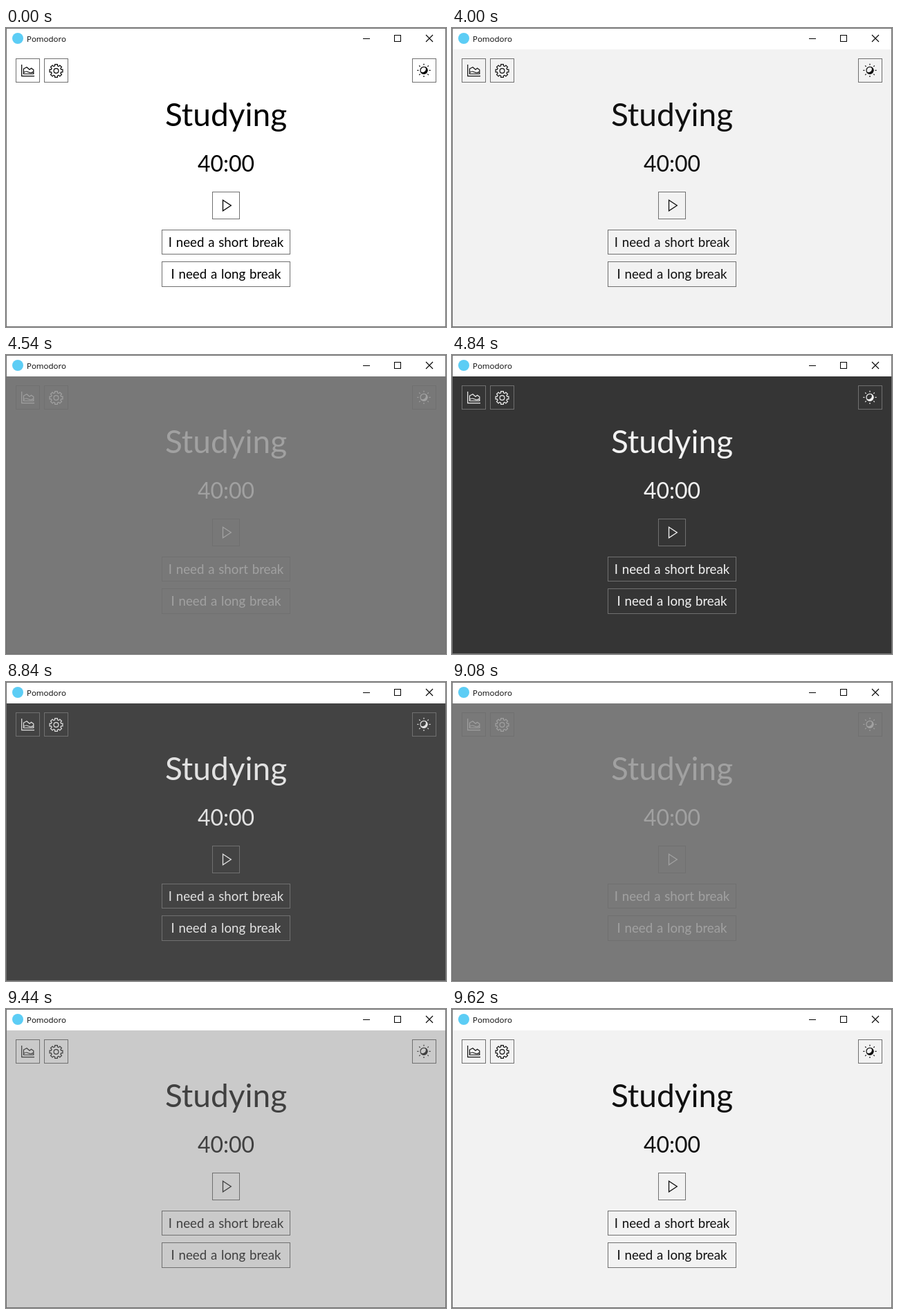
Animation of 636 by 433 pixels, one loop 9680 ms. Source, as an HTML page:

```html
<!DOCTYPE html>
<html lang="en">
<head>
<meta charset="utf-8">
<title>Pomodoro</title>
<style>
  html, body { margin: 0; width: 100%; height: 100%; overflow: hidden; background: #fff; }
  svg { display: block; width: 100vw; height: 100vh; }

  .surface { fill: #fff; animation: surface 9680ms infinite; }
  .content { color: #000; animation: ink 9680ms infinite; }
  .surface, .content { animation-timing-function: step-end; }

  /* Each fade takes 15 steps of 60 ms; the last step back is the loop restart. */
  @keyframes surface {
    0% { fill: #fff; }
    41.3223% { fill: #fff; animation-timing-function: steps(15, jump-start); }
    50.6198%  { fill: #353535; }
    91.3223% { fill: #353535; animation-timing-function: steps(14, jump-start); }
    100% { fill: #f2f2f2; }
  }
  @keyframes ink {
    0% { color: #000; }
    41.3223% { color: #000; animation-timing-function: steps(15, jump-start); }
    50.6198% { color: #f2f2f2; }
    91.3223% { color: #f2f2f2; animation-timing-function: steps(14, jump-start); }
    100% { color: #101010; }
  }

  .box { fill: none; stroke: #707070; shape-rendering: crispEdges; }
  .line { fill: none; stroke: currentColor; stroke-width: 1.2; }
  .label { fill: currentColor; font-family: Lato, sans-serif; text-anchor: middle; }
  .title { font-size: 46px; }
  .timer { font-size: 32px; }
  .button { font-size: 18.7px; word-spacing: 1px; }
  .caption { font: 11.5px "Open Sans", "Noto Sans", sans-serif; }
  .controls { fill: none; stroke: #000; }
</style>
</head>
<body>
<svg viewBox="0 0 636 433">
  <rect width="636" height="433" fill="#fff"/>
  <circle cx="17" cy="15" r="8" fill="#5ccdf5"/>
  <text class="caption" x="30" y="20">Pomodoro</text>
  <g class="controls">
    <path d="M516 15.5h10M561.5 10.5h9v9h-9z" shape-rendering="crispEdges"/>
    <path d="M607 10l10 10M617 10l-10 10" stroke-width="1.1"/>
  </g>

  <rect class="surface" y="31" width="636" height="402"/>
  <g class="box">
    <path d="M.5 .5h635v432h-635z"/>
    <path d="M14.5 44.5h34v34h-34zM55.5 44.5h34v34h-34zM587.5 44.5h34v34h-34z"/>
    <path d="M298.5 237.5h39v39h-39z"/>
    <path d="M225.5 292.5h185v35h-185zM225.5 338.5h185v36h-185z"/>
  </g>

  <g class="content">
    <g class="line">
      <path d="M22.7 53v16.7H41"/>
      <path d="M25.5 66.5v-7.5l4.5-2.2 4 3.4 2.6-2 3.2 2.3v6z"/>
      <path d="M25.5 64.6q3-2.2 5-1.4t4 1.4 5-1"/>
      <path id="gear" transform="translate(72.5 62)"/>
      <circle cx="72.5" cy="62" r="3.4"/>
      <path d="M313.5 249.3l11.8 7.7-11.8 7.7z" stroke-width="1.3"/>
      <circle cx="604" cy="61.3" r="5"/>
      <path id="rays" transform="translate(604 61.3)"/>
    </g>
    <path d="M605.5 56a5.5 5.5 0 1 1-6.8 6.8a4.6 4.6 0 0 0 6.8-6.8z" fill="currentColor"/>

    <text class="label title" x="318" y="142">Studying</text>
    <text class="label timer" x="318" y="208">40:00</text>
    <text class="label button" x="318" y="317">I need a short break</text>
    <text class="label button" x="318" y="363">I need a long break</text>
  </g>
</svg>
<script>
  const polar = (radius, degrees) => {
    const angle = degrees * Math.PI / 180;
    return `${(radius * Math.cos(angle)).toFixed(2)} ${(radius * Math.sin(angle)).toFixed(2)}`;
  };
  const angles = Array.from({ length: 8 }, (_, i) => i * 45);
  const setPath = (id, d) => document.getElementById(id).setAttribute('d', d);

  const tooth = [[7.4, -15], [9.6, -11], [9.6, 11], [7.4, 15]];
  const outline = angles.flatMap(a => tooth.map(([r, offset]) => polar(r, a + offset)));
  setPath('gear', `M${outline.join('L')}Z`);
  setPath('rays', angles.map(a => `M${polar(7.6, a)}L${polar(9.6, a)}`).join(''));
</script>
</body>
</html>
```
